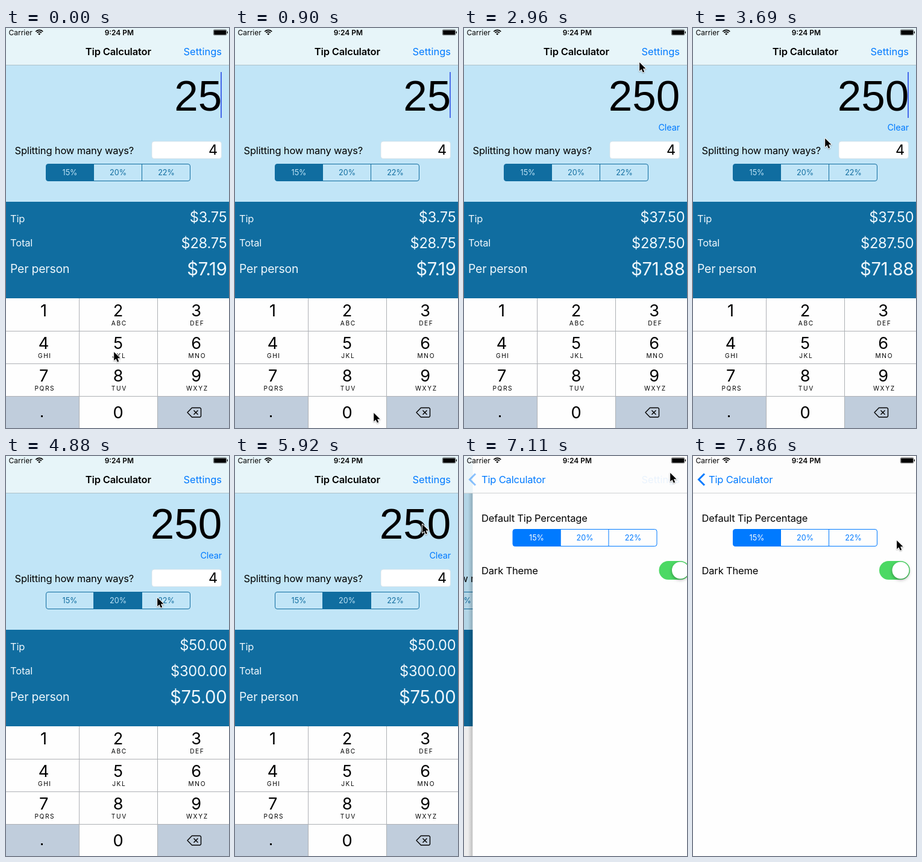
An HTML page with a canvas that plays this animation: 370 px wide and 663 px high, repeating every 8 s.

```html
<!DOCTYPE html>
<html lang="en">
<head>
<meta charset="utf-8">
<title>Tip Calculator</title>
<style>
  html, body { margin: 0; width: 100%; height: 100%; overflow: hidden; background: #fff; }
  canvas { display: block; width: 370px; height: 663px; }
</style>
</head>
<body>
<canvas id="stage"></canvas>
<script>
const W = 370, H = 663, LOOP = 8000, TICK = 148;
const SKY = '#c1e5f7', SEA = '#106da0', BLUE = '#007aff', PALE = '#eef7fc';
const TYPED = 1300, PICKED = 4400, PRESSED = 6600, PUSHED = 7100;

const canvas = document.getElementById('stage');
const ctx = canvas.getContext('2d');
const scale = window.devicePixelRatio || 1;
canvas.width = W * scale;
canvas.height = H * scale;

// Pointer stops: time, x, y
const pointerPath = [
  [0, 178, 536], [300, 175, 575], [700, 215, 636], [900, 230, 637],
  [1200, 230, 637], [1480, 240, 590], [2072, 345, 307], [2220, 322, 261],
  [2368, 247, 249], [2520, 247, 249], [2960, 290, 56], [3260, 300, 90],
  [3700, 218, 182], [4144, 195, 237], [4430, 195, 238], [4884, 250, 234],
  [5476, 250, 234], [6212, 349, 32], [6512, 341, 27], [7400, 341, 27],
  [7844, 337, 139], [LOOP, 337, 139]
];

function rect(x, y, w, h, color) {
  ctx.fillStyle = color;
  ctx.fillRect(x, y, w, h);
}

function roundRect(x, y, w, h, r) {
  ctx.beginPath();
  ctx.roundRect(x, y, w, h, r);
}

function polyline(points, close) {
  ctx.beginPath();
  points.forEach(([x, y]) => ctx.lineTo(x, y));
  if (close) ctx.closePath();
}

// y is the middle of the capital letters
function text(str, x, y, size, color, { align = 'left', weight = 400, gap } = {}) {
  ctx.font = `${weight} ${size}px Inter, sans-serif`;
  ctx.letterSpacing = `${gap ?? (size > 13 ? -0.01 * size : 0)}px`;
  ctx.textAlign = align;
  ctx.fillStyle = color;
  ctx.fillText(str, x, y + size * 0.3635);
}

function segments(y, selected, color, back) {
  roundRect(66.5, y + 0.5, 239, 28, 3.5);
  ctx.strokeStyle = color;
  ctx.lineWidth = 1;
  ctx.stroke();
  ctx.save();
  ctx.clip();
  rect(66 + selected * 80, y, 80, 29, color);
  ctx.restore();
  [145, 225].forEach(x => rect(x, y, 1, 29, color));
  ['15%', '20%', '22%'].forEach((label, i) =>
    text(label, 106 + i * 80, y + 14.5, 12.6, i === selected ? back : color, { align: 'center' }));
}

function caretAlpha(t) {
  if (t >= 1180 && t < 1600) return 1;
  const phase = (t < 1180 ? t + 500 : t) % 970;
  if (phase < 230) return 0;
  if (phase < 430) return (phase - 230) / 200;
  return phase < 820 ? 1 : Math.max(0, 1 - (phase - 820) / 110);
}

function calculator(t) {
  const bill = t < TYPED ? 25 : 250;
  const choice = t < PICKED ? 0 : 1;
  const tip = bill * [0.15, 0.2][choice];
  const money = n => '$' + n.toFixed(2);

  rect(0, 61, W, 227, SKY);
  rect(0, 288, W, 160, SEA);

  ctx.font = '71px "Liberation Sans", Arial, sans-serif';
  ctx.letterSpacing = '0px';
  ctx.textAlign = 'right';
  ctx.fillStyle = '#000';
  ctx.fillText(bill, 358.2, 137);
  if (t < PUSHED) {
    ctx.globalAlpha = caretAlpha(t);
    rect(356, 73, 2, 76, '#4467ea');
    ctx.globalAlpha = 1;
  }
  if (bill > 25) text('Clear', 358, 164.5, 14.5, BLUE, { align: 'right' });

  text('Splitting how many ways?', 14.5, 203, 16.5, '#000');
  roundRect(242, 188, 115.5, 28.5, 4);
  ctx.fillStyle = '#fff';
  ctx.fill();
  ctx.strokeStyle = '#d4dfe5';
  ctx.lineWidth = 0.7;
  ctx.stroke();
  text('4', 351, 201.5, 23.5, '#000', { align: 'right' });
  segments(225, choice, SEA, SKY);

  [['Tip', tip, 316, 313.7, 16.5, 23.7],
   ['Total', bill + tip, 356.5, 356.5, 16.5, 23.7],
   ['Per person', (bill + tip) / 4, 399, 399.5, 19.4, 29.3]
  ].forEach(([label, value, y, valueY, size, valueSize]) => {
    text(label, 7, y, size, PALE);
    text(money(value), 366.5, valueY, valueSize, PALE, { align: 'right' });
  });
}

function keypad() {
  const columns = [62.5, 186, 315.5];
  const letters = ['', 'ABC', 'DEF', 'GHI', 'JKL', 'MNO', 'PQRS', 'TUV', 'WXYZ'];
  rect(0, 448, W, 215, '#fefefe');
  rect(0, 611, 121, 52, '#c0cddc');
  rect(252, 611, 118, 52, '#c0cddc');
  [502, 556, 610].forEach(y => rect(0, y, W, 1, '#aeb1b5'));
  [121, 251].forEach(x => rect(x, 448, 1, 215, '#aeb1b5'));

  letters.forEach((word, i) => {
    const x = columns[i % 3], y = 468 + Math.floor(i / 3) * 54;
    text(i + 1, x, y, 27.2, '#000', { align: 'center' });
    text(word, x + 1.8, y + 21.5, 10.2, '#000', { align: 'center', gap: 1.6 });
  });
  text('0', columns[1], 637, 27.2, '#000', { align: 'center' });
  rect(58, 642, 3, 3, '#000');

  ctx.strokeStyle = '#000';
  ctx.lineWidth = 1.4;
  ctx.lineJoin = 'round';
  polyline([[301, 637.3], [308.5, 629.5], [322, 629.5], [323.5, 631],
            [323.5, 643.5], [322, 645], [308.5, 645]], true);
  ctx.stroke();
  polyline([[311.5, 633.8], [318.5, 640.8]]);
  ctx.stroke();
  polyline([[318.5, 633.8], [311.5, 640.8]]);
  ctx.stroke();
}

function settings() {
  rect(0, 0, W, H, '#fefefe');
  text('Default Tip Percentage', 14.5, 103, 16.5, '#000');
  segments(121, 0, BLUE, '#fff');
  text('Dark Theme', 14.5, 190, 16.5, '#000');
  roundRect(309, 174, 51, 31, 15.5);
  ctx.fillStyle = '#4cd964';
  ctx.fill();
  ctx.save();
  ctx.shadowColor = 'rgba(0,0,0,.35)';
  ctx.shadowBlur = 5 * scale;
  ctx.shadowOffsetY = 2 * scale;
  ctx.beginPath();
  ctx.arc(344.5, 189.5, 14, 0, Math.PI * 2);
  ctx.fillStyle = '#fff';
  ctx.fill();
  ctx.restore();
}

function settingsLink(alpha) {
  ctx.globalAlpha = alpha;
  text('Settings', 358, 39.5, 16.5, BLUE, { align: 'right', gap: 0 });
  ctx.globalAlpha = 1;
}

function push(t) {
  const rest = Math.exp(-(t - 7104) / 70);
  const offset = 14.5 * rest;

  rect(0, 0, W, H, '#fff');
  ctx.save();
  ctx.translate(-0.3 * (W - offset), 0);
  calculator(t);
  ctx.restore();
  rect(0, 0, offset, H, 'rgba(0,0,0,.07)');
  const shade = ctx.createLinearGradient(offset - 8, 0, offset, 0);
  shade.addColorStop(0, 'rgba(0,0,0,0)');
  shade.addColorStop(1, 'rgba(0,0,0,.2)');
  rect(offset - 8, 61, 8, H, shade);

  ctx.save();
  ctx.translate(offset, 0);
  settings();
  ctx.restore();

  rect(0, 0, W, 61, '#fdfdfd');
  rect(0, 0, offset, 61, '#ebf4f8');
  rect(0, 61, W, 1, '#cfd1d3');
  ctx.globalAlpha = 1 - 0.55 * rest;
  ctx.strokeStyle = BLUE;
  ctx.lineWidth = 3;
  ctx.lineJoin = 'miter';
  polyline([[19, 29.5], [9.5, 39], [19, 48.5]]);
  ctx.stroke();
  ctx.globalAlpha = 1;
  text('Tip Calculator', 26 + 3 * rest, 39.5, 16.5, BLUE);
  settingsLink(0.08 * rest);
}

function statusBar() {
  text('Carrier', 4.5, 7.5, 12, '#000');
  text('9:24 PM', 187.8, 7.5, 11.9, '#000', { align: 'center', weight: 600 });

  ctx.strokeStyle = ctx.fillStyle = '#000';
  ctx.lineWidth = 1.7;
  [8.2, 5.2].forEach(r => {
    ctx.beginPath();
    ctx.arc(55.2, 11.6, r, -Math.PI * 0.76, -Math.PI * 0.24);
    ctx.stroke();
  });
  ctx.beginPath();
  ctx.moveTo(55.2, 11.8);
  ctx.arc(55.2, 11.6, 2.8, -Math.PI * 0.76, -Math.PI * 0.24);
  ctx.fill();

  ctx.lineWidth = 0.6;
  roundRect(344.3, 2.8, 21.6, 9, 1.8);
  ctx.stroke();
  roundRect(345.2, 3.7, 19.8, 7.2, 0.8);
  ctx.fill();
  roundRect(366.6, 5.6, 1.3, 3.4, 0.6);
  ctx.fill();
}

function pointer(t) {
  const i = pointerPath.findIndex(stop => stop[0] > t);
  const [t0, x0, y0] = pointerPath[i - 1], [t1, x1, y1] = pointerPath[i];
  const k = (t - t0) / (t1 - t0);
  ctx.save();
  ctx.translate(x0 + (x1 - x0) * k + 1.2, y0 + (y1 - y0) * k + 1);
  polyline([[0, 0], [0, 14.3], [3.3, 11.2], [5.6, 16.4], [8, 15.4], [5.8, 10.3], [10.3, 10.3]], true);
  ctx.lineJoin = 'round';
  ctx.lineWidth = 2;
  ctx.strokeStyle = '#fff';
  ctx.shadowColor = 'rgba(0,0,0,.3)';
  ctx.shadowBlur = 2 * scale;
  ctx.shadowOffsetY = scale;
  ctx.stroke();
  ctx.shadowColor = 'transparent';
  ctx.fillStyle = '#000';
  ctx.fill();
  ctx.restore();
}

function draw(t) {
  ctx.setTransform(scale, 0, 0, scale, 0, 0);
  if (t < PUSHED) {
    calculator(t);
    keypad();
    rect(0, 0, W, 61, '#e7f5f9');
    rect(0, 61, W, 1, '#acc1cb');
    text('Tip Calculator', 186.3, 39.5, 16.5, '#000', { align: 'center', weight: 600 });
    settingsLink(t < PRESSED ? 1 : 0.2);
  } else {
    push(t);
  }
  statusBar();
  pointer(t);
}

// The screen refreshes in even steps, like a low-rate recording.
const start = performance.now();
function frame() {
  const t = (performance.now() - start) % LOOP;
  draw(Math.min(53, Math.floor((t + 12) / TICK)) * TICK);
  requestAnimationFrame(frame);
}
frame();
</script>
</body>
</html>
```
